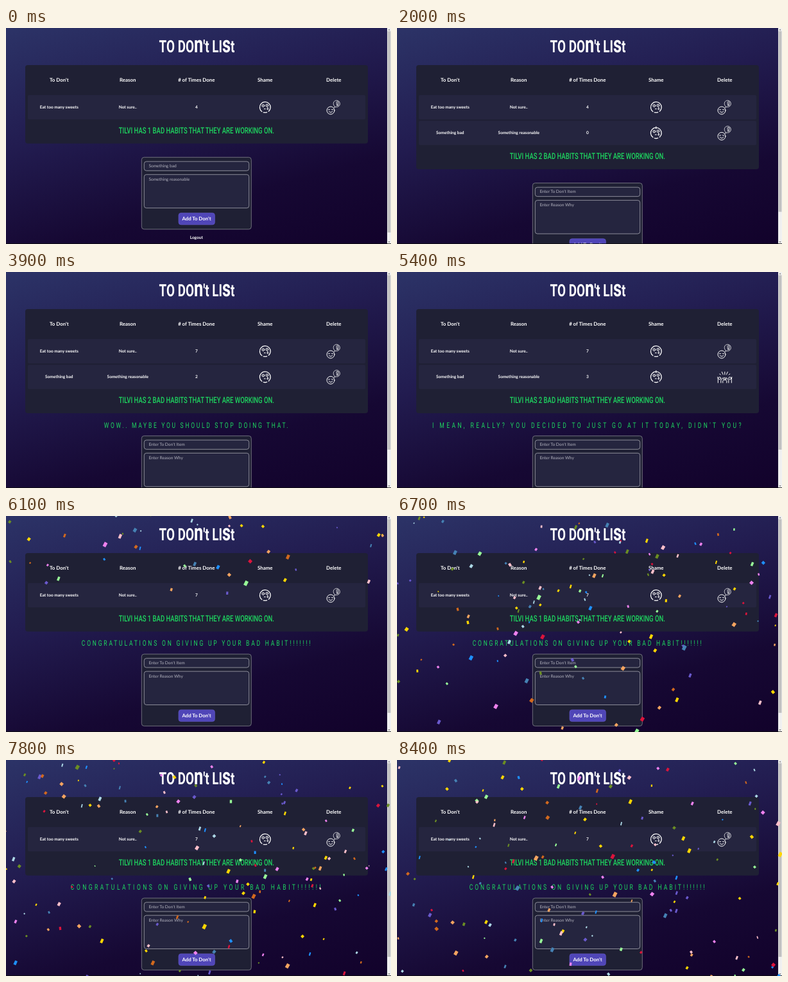
An HTML page with a canvas for the animation above (8500 ms loop, 600 by 338 pixels).

```html
<!DOCTYPE html>
<html lang="en">
<head>
<meta charset="utf-8">
<title>To Don't List</title>
<style>
html, body { margin: 0; width: 100%; height: 100%; overflow: hidden; background: #12022b; }
#stage { position: absolute; left: 0; top: 0; width: 600px; height: 338px;
  background: linear-gradient(165deg, #2c3367 0%, #221c50 38%, #160833 72%, #12022b 100%); }
svg, canvas { position: absolute; left: 0; top: 0; }
text { font: 700 6.55px Lato, sans-serif; fill: #fff; text-anchor: middle; text-rendering: geometricPrecision; }
.head text { font-size: 7.9px; }
.display { font-family: Roboto, sans-serif; }
#title { font-size: 26.5px; }
#title .tall { font-size: 35.8px; }
#summary { font-size: 13.4px; font-weight: 500; fill: #1ed760; }
#message { font-size: 12px; font-weight: 400; fill: #1ed760; }
.field text { font-size: 6.6px; font-weight: 400; text-anchor: start; fill: #b4b4bf; }
.field rect { fill: #25253f; stroke: #b9b9c2; stroke-width: .7; }
.row { fill: #25253f; }
.icon { fill: none; stroke: #fff; stroke-width: 1; stroke-linecap: round; }
</style>
</head>
<body>
<div id="stage">
<svg width="600" height="338" viewBox="0 0 600 338">
  <defs>
    <g id="shame" class="icon">
      <path d="M-5 6.8A8.4 8.4 0 1 1 5.5 6.4M-2.5 8.1A8.4 8.4 0 0 0 2.8 7.9" stroke-width="1.3"/>
      <circle cx="-3" cy="-2.4" r="1.9"/><circle cx="3" cy="-2.8" r="1.9"/>
      <path d="M-3 -2.4h.1M3 -2.8h.1M-1.5 2.6h2M4 .6q-2 3 0 3.2q2 -.2 0 -3.2"/>
    </g>
    <g id="calm" class="icon">
      <circle cx="-4.8" cy="5" r="6"/>
      <path d="M-8.6 3.6q1.2 1 2.4 0M-3.4 3.6q1.2 1 2.4 0M-7.6 6.6q2.8 3 5.6 0"/>
      <path d="M1.6 -1.2L.6 .6L3.2 -.5A5.2 5.2 0 1 0 1.6 -1.2M3.8 -8h4M4.3 -6.8l.4 4.4h2.4l.4 -4.4M5.8 -6v2.6M5.2 -9h1.2" stroke-width=".7"/>
    </g>
    <g id="cheer" class="icon" stroke-width=".9">
      <path d="M-10.5 9v-5l-.5 -4M-6 9v-4l3.5 -4M-3 9v-3l3 -3l3 3v3M10.5 9v-5l.5 -4M6 9v-4l-3.5 -4"/>
      <circle cx="-8" cy="2" r="1.9"/><circle cx="0" cy="3" r="1.9"/><circle cx="8" cy="2" r="1.9"/>
      <path d="M0 -8v4M-4.5 -8l1.8 4M4.5 -8l-1.8 4M-8 -5l1.5 1.6M8 -5l-1.5 1.6"/>
    </g>
  </defs>

  <g transform="translate(297.5 37.5) scale(.71 1)">
    <text id="title" class="display">TO DO<tspan class="tall">n</tspan>'t LI<tspan class="tall">s</tspan>t</text>
  </g>
  <rect id="card" x="30" y="58" width="534" rx="4" fill="#1f2034"/>
  <g id="head" class="head"></g>
  <g id="first">
    <rect class="row" x="34" y="105" width="526" height="38" rx="2"/>
    <use href="#shame" x="403.8" y="124"/><use href="#calm" x="510.8" y="124"/>
  </g>
  <g id="second" transform="translate(0 40.3)">
    <rect class="row" x="34" y="105" width="526" height="38" rx="2"/>
    <use href="#shame" x="403.8" y="124"/><use id="remove" x="510.8" y="124"/>
    <path id="tick" class="icon" d="M403.8 114v3.5"/>
  </g>
  <g id="below">
    <g transform="translate(296.8 165) scale(.71 1)"><text id="summary" class="display"></text></g>
    <g transform="translate(297.5 203.4) scale(.71 1)"><text id="message" class="display"></text></g>
  </g>
  <g id="form">
    <rect x="211.3" y="202.3" width="171" height="112.6" rx="4" fill="#1f2034" stroke="#85868f" stroke-width=".8"/>
    <g class="field">
      <rect x="215.3" y="208.9" width="163.4" height="14.4" rx="3.5"/>
      <rect x="215.3" y="229.3" width="163.4" height="52.4" rx="3.5"/>
      <text id="item" x="222.4" y="218.2"></text>
      <text id="reason" x="222.4" y="238.8"></text>
    </g>
    <rect id="button" x="269" y="289.4" width="56.4" height="18.4" rx="3.8" stroke="#6a5fd0" stroke-width=".6"/>
    <text x="297" y="301.4" style="font-size:7.8px">Add To Don't</text>
    <text x="296.8" y="330">Logout</text>
  </g>
  <rect x="594" width="6" height="338" fill="#f1f1f1"/>
  <path d="M595.5 3.5l1.5 -2l1.5 2zM595.5 334l1.5 2l1.5 -2z" fill="#777"/>
  <rect id="thumb" x="594.6" y="5" width="4.8" fill="#c1c1c1"/>
  <rect y="337.2" width="600" height=".8" fill="#101010"/>
</svg>
<canvas width="600" height="338"></canvas>
</div>
<script>
const LOOP = 8500, ADDED = 1400, REMOVED = 5800, ROW = 40.3;
const COLUMNS = [82.8, 189.8, 296.8, 403.8, 510.8];
const COLORS = ['DodgerBlue', 'OliveDrab', 'Gold', 'Pink', 'SlateBlue', 'LightBlue', 'Gold', 'Violet',
  'PaleGreen', 'SteelBlue', 'SandyBrown', 'Chocolate', 'Crimson'];
const $ = id => document.getElementById(id);
const ctx = document.querySelector('canvas').getContext('2d');

function addCells(id, y, labels) {
  return labels.map((label, i) => {
    const cell = document.createElementNS('http://www.w3.org/2000/svg', 'text');
    cell.setAttribute('x', COLUMNS[i]);
    cell.setAttribute('y', y);
    cell.textContent = label;
    return $(id).appendChild(cell);
  });
}
addCells('head', 84.3, ["To Don't", 'Reason', '# of Times Done', 'Shame', 'Delete']);
const firstCount = addCells('first', 126, ['Eat too many sweets', 'Not sure..', 4])[2];
const secondCount = addCells('second', 126, ['Something bad', 'Something reasonable', 0])[2];

const setText = (el, value) => { if (el.textContent !== String(value)) el.textContent = value; };
const show = (el, visible) => el.setAttribute('visibility', visible ? 'visible' : 'hidden');
const shift = (id, y) => $(id).setAttribute('transform', `translate(0 ${y})`);
const clicks = (t, times) => times.filter(at => t >= at).length;

function messageAt(t) {
  if (t < 2200) return '';
  if (t < 4100) return 'WOW.. MAYBE YOU SHOULD STOP DOING THAT.';
  if (t < REMOVED) return "I MEAN, REALLY? YOU DECIDED TO JUST GO AT IT TODAY, DIDN'T YOU?";
  return 'CONGRATULATIONS ON GIVING UP YOUR BAD HABIT!!!!!!!';
}

function random(i, k) {
  const v = Math.sin(i * 127.1 + k * 311.7 + 5) * 43758.5453;
  return v - Math.floor(v);
}

// Simulated on a 1900 x 1080 page, then scaled down to the stage.
function drawConfetti(t) {
  ctx.setTransform(1, 0, 0, 1, 0, 0);
  ctx.clearRect(0, 0, 600, 338);
  if (t < REMOVED) return;
  ctx.scale(.3125, .3125);
  const steps = (t - REMOVED + 50) * .135, fall = 1110;
  for (let i = 0; i < 150; i++) {
    const r = 11 + 22 * random(i, 1);
    const speed = (Math.cos(random(i, 2) * 150 + 11) + 3 + r / 2) / 2;
    const travel = random(i, 3) * 1080 - 1050 + speed * steps;
    const lap = Math.max(0, Math.floor(travel / fall));
    const x = random(i, 10 + lap) * 1900, y = travel - lap * fall - 30;
    const tilt = Math.sin((random(i, 4) * .07 + .05) * steps - i / 3) * 15;
    ctx.beginPath();
    ctx.lineWidth = r / 2;
    ctx.strokeStyle = COLORS[i % COLORS.length];
    ctx.moveTo(x + tilt + r / 3, y);
    ctx.lineTo(x + tilt, y + tilt + r / 5);
    ctx.stroke();
  }
}

function draw(t) {
  const two = t >= ADDED && t < REMOVED, extra = two ? ROW : 0;
  const message = messageAt(t), formShift = extra + (message ? 13.8 : 0);

  $('card').setAttribute('height', 122.8 + extra);
  show($('second'), two);
  show($('tick'), two && (t < 3100 || t >= 4900));
  $('remove').setAttribute('href', t >= 5000 ? '#cheer' : '#calm');
  setText(firstCount, 4 + clicks(t, [2200, 2500, 2800]));
  setText(secondCount, clicks(t, [3300, 3700, 4100]));

  shift('below', extra);
  setText($('summary'), `TILVI HAS ${two ? 2 : 1} BAD HABITS THAT THEY ARE WORKING ON.`);
  setText($('message'), message);
  const spacing = 3.1 + .4 * Math.cos((t - 5120) / 2550 * 2 * Math.PI);
  $('message').style.letterSpacing = spacing / .71 + 'px';

  shift('form', formShift);
  const typed = t < ADDED;
  setText($('item'), typed ? 'Something bad' : "Enter To Don't Item");
  setText($('reason'), typed ? 'Something reasonable' : 'Enter Reason Why');
  $('button').setAttribute('fill', t >= 800 && t < ADDED ? '#5f54cc' : '#5046b8');
  $('thumb').setAttribute('height', 328 * 338 / (352 + formShift));

  drawConfetti(t);
}

function frame() {
  draw(performance.now() % LOOP);
  requestAnimationFrame(frame);
}
frame();
</script>
</body>
</html>
```
